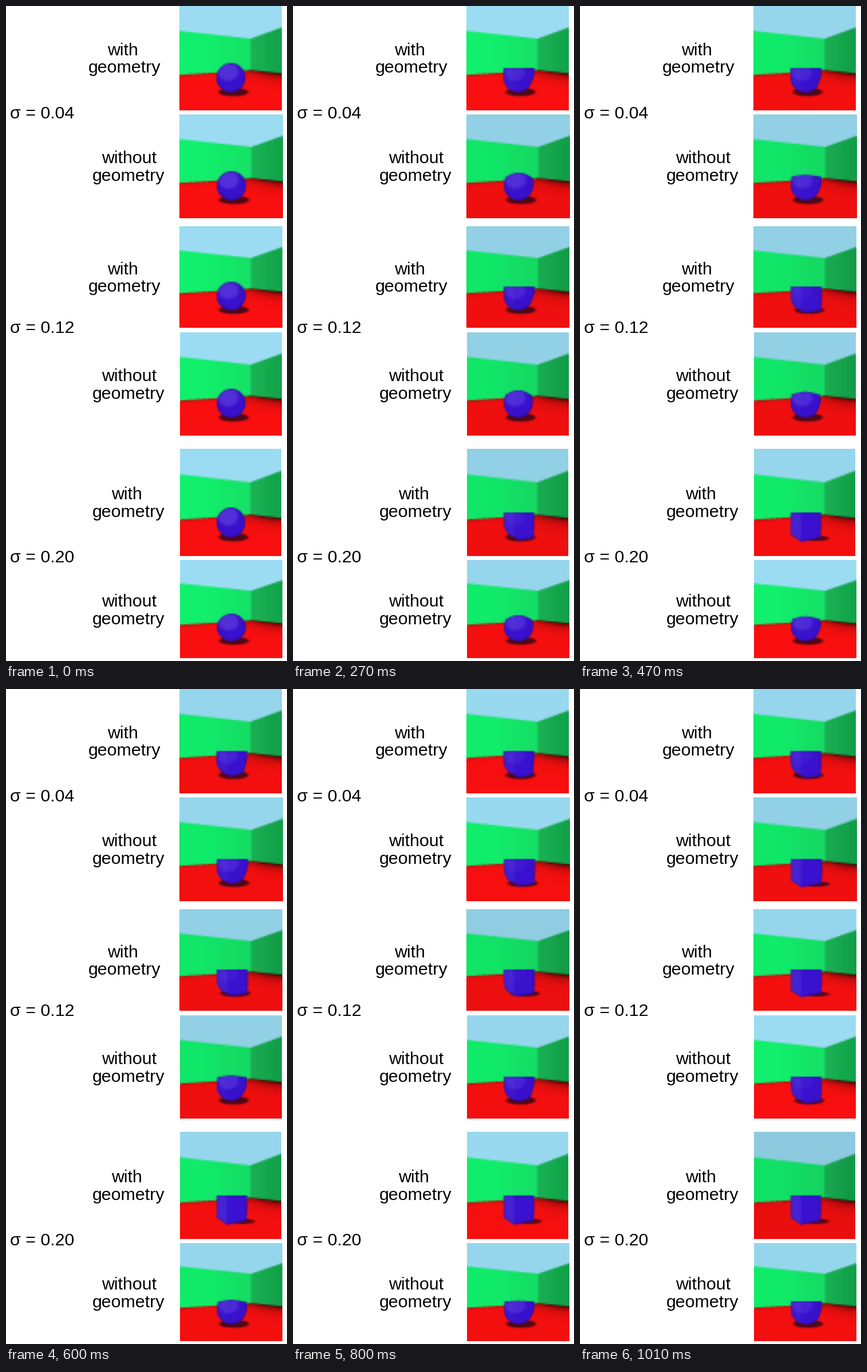
A matplotlib script for the animation above (1.14 s loop, 491x1142 px).

```python
import numpy as np
import matplotlib.pyplot as plt
from matplotlib.animation import FuncAnimation

W, H, DPI = 491, 1142, 64
STEP, LOOP = 10, 1140
STARTS = [0, 70, 200, 270, 400, 470, 600, 670, 800, 870, 1010]
KEYS = [0, 1, 3, 5, 7, 9, 10]      # steps at which the morph keys apply
GRID, OVER = 64, 4                 # panel resolution and supersampling

BOXES = [(303, 0, 482, 182), (303, 189, 484, 370), (303, 384, 483, 561),
         (304, 569, 482, 749), (304, 772, 481, 959), (304, 966, 483, 1137)]

# Morph progress: 0 ball, 1 flat top, 2 right side squared, 3 cube
MORPH = [[0, .12, 1, 1.15, 1.6, 2.0, 2.1],
         [0, .1, .3, .75, 1.6, 2.8, 3],
         [0, .15, 1, 2.2, 2.2, 2.9, 3],
         [0, .12, .3, .6, .9, 1.6, 2.2],
         [0, .3, 2.0, 3, 3, 3, 3],
         [0, .1, .3, .55, .8, .95, 1.2]]
DIM = [[0, 1, 0, 1, 1, 0, 1],
       [0, 1, 2, 2, 0, 1, 2],
       [0, 1, 2, 2, 2, 3, 1],
       [0, 1, 2, 2, 2, 0, 0],
       [0, 2, 2, 1, 1, 0, 3],
       [0, 1, 1, 0, 2, 0, 1]]

R = 25.5
CUBE = np.array([(-25, -17), (29, -17), (28.5, 26), (-7, 33), (-25, 21)], float)

n = GRID * OVER
axis = (np.arange(n) + .5) / n
U, V = np.meshgrid(axis, axis)
X, Y = (U - .503) * 180, (V - .687) * 182
DIST = np.hypot(X, Y) + 1e-6
DX, DY = X / DIST, Y / DIST


def ramp(a, b, x):
    t = np.clip((x - a) / (b - a), 0, 1)
    return t * t * (3 - 2 * t)


def mix(a, b, w):
    w = np.asarray(w)[..., None]
    return np.asarray(a, float) * (1 - w) + np.asarray(b, float) * w


def cube_radius():
    """Distance from the centre to the cube outline in each direction."""
    r = np.full(X.shape, 99.0)
    for (x0, y0), (x1, y1) in zip(CUBE, np.roll(CUBE, -1, axis=0)):
        nx, ny = y1 - y0, x0 - x1
        along = nx * DX + ny * DY
        hit = (nx * x0 + ny * y0) / np.where(along > 1e-6, along, 1e-6)
        r = np.minimum(r, hit)
    return r


CUBE_R = cube_radius()
W_TOP = ramp(-.3, .25, -DY)
W_RIGHT = ramp(-.4, .3, DX)


def room(dim):
    level = 1 - .027 * dim
    top = np.interp(U, [0, .695, 1], [.238, .313, .205])
    base = np.interp(U, [0, .45, .7, 1], [.66, .632, .613, .645])
    left = mix((17, 240, 108), (22, 226, 102), ramp(.2, .7, U))
    right = mix((26, 178, 84), (18, 164, 74), ramp(.7, 1, U))
    img = np.where((U < .695)[..., None], left, right) * (1 - .02 * dim)
    img[V < top] = np.array((155, 220, 243)) * level

    depth = np.clip(V - base, 0, 1)
    dark = .62 * np.exp(-depth / .045) * ramp(.45, .95, U)
    dark += .3 * np.exp(-depth / .012)
    floor = np.array((250, 16, 16)) * (1 - .02 * dim)
    floor = floor * (1 - np.clip(dark, 0, .8))[..., None]
    return np.where((V >= base)[..., None], floor, img)


def panel(p, dim):
    top, right, left = (np.clip(p - k, 0, 1) for k in range(3))
    img = room(dim)

    cx, cy = 4.5 + 13 * left, 25 + 2 * left
    rx, ry = 27 - left, 7.5 - 3 * left
    e = np.hypot((X - cx) / rx, (Y - cy) / ry)
    img = mix(img, (72, 8, 24), .95 * ramp(1.12, .82, e))

    w = W_TOP * top + (1 - W_TOP) * (W_RIGHT * right + (1 - W_RIGHT) * left)
    edge = R + (CUBE_R - R) * w
    glow = ramp(22, 13, np.hypot(X + 5, (Y + 10) * 1.15))
    ball = mix((57, 17, 204), (82, 48, 217), glow)
    cube = mix((70, 36, 212), (58, 17, 208), ramp(-10, -4, X))
    body = mix(ball, cube, np.full(X.shape, (top + right + left) / 3))
    body *= (1 - .22 * ramp(.86, 1, DIST / edge))[..., None]
    img = np.where((DIST < edge)[..., None], body, img)

    img = img.reshape(GRID, OVER, GRID, OVER, 3).mean(axis=(1, 3))
    return np.clip(img, 0, 255).astype(np.uint8)


def panel_steps(morph, dim):
    steps = range(len(STARTS))
    return [panel(np.interp(k, KEYS, morph), np.interp(k, KEYS, dim))
            for k in steps]


fig = plt.figure(figsize=(W / DPI, H / DPI), dpi=DPI, facecolor="white")
ax = fig.add_axes([0, 0, 1, 1])
ax.axis("off")


def write(x, y, s, ha="center"):
    ax.text(x, y, s, ha=ha, va="baseline", color="black",
            family=["Liberation Sans", "DejaVu Sans"], fontsize=30.4 * 72 / DPI)


for y, sigma in [(195.5, "0.04"), (570.5, "0.12"), (970.5, "0.20")]:
    write(7, y, "σ = " + sigma, ha="left")

for i, (x, y) in enumerate([(207.5, 86), (214.5, 274.5), (207.5, 467.5),
                            (214.5, 654.5), (214.5, 860.5), (214.5, 1047)]):
    if i % 2:
        write(x + 1, y, "without")
    else:
        write(x - 4, y, "with")
    write(x, y + 30.5, "geometry")

movies = [panel_steps(m, d) for m, d in zip(MORPH, DIM)]
views = [ax.imshow(movie[0], extent=(x0, x1, y1, y0), aspect="auto",
                   interpolation="bilinear")
         for movie, (x0, y0, x1, y1) in zip(movies, BOXES)]
ax.set_xlim(0, W)
ax.set_ylim(H, 0)


def update(i):
    k = np.searchsorted(STARTS, i * STEP, side="right") - 1
    for view, movie in zip(views, movies):
        view.set_data(movie[k])
    return views


anim = FuncAnimation(fig, update, frames=LOOP // STEP, interval=STEP,
                     repeat=True, repeat_delay=0)
plt.show()
```
